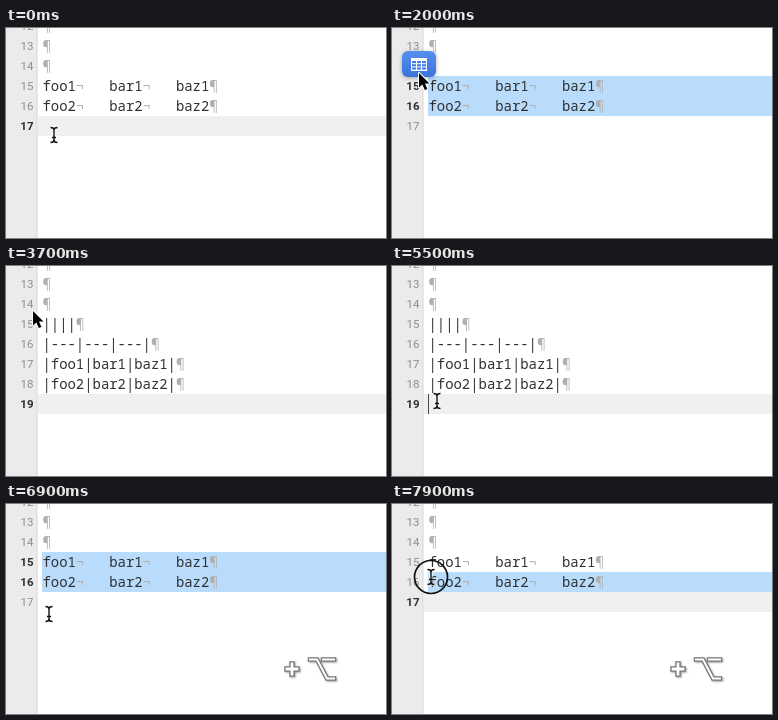
Recreate the animation shown at these times as an HTML page with a canvas. Size 380 by 210 pixels, loop 8000 ms.

```html
<!DOCTYPE html>
<html lang="en">
<head>
<meta charset="utf-8">
<title>Tabbed text to table</title>
<style>
html, body { margin: 0; width: 100%; height: 100%; overflow: hidden; background: #fff; }
canvas { display: block; }
</style>
</head>
<body>
<canvas id="stage" width="380" height="210"></canvas>
<script>
const ctx = document.getElementById('stage').getContext('2d');
const LOOP = 8000, STEP = 100, ROW = 20, LEFT = 36.5, CELL = 8.34;
const MONO = '13.9px "Noto Sans Mono", "DejaVu Sans Mono", monospace';
const TABBED = ['¶', '¶', '¶', 'foo1¬\tbar1¬\tbaz1¶', 'foo2¬\tbar2¬\tbaz2¶', ''];
const TABLE = ['¶', '¶', '¶', '||||¶', '|---|---|---|¶', '|foo1|bar1|baz1|¶', '|foo2|bar2|baz2|¶', ''];

// Pointer path: time, x, y
const PATH = [
  [400, 48, 107], [500, 47, 104], [600, 42, 95], [700, 34, 79], [800, 29, 68], [1000, 27, 61],
  [1400, 27, 61], [1700, 27, 45],
  [4700, 27, 45], [4900, 28, 51], [5200, 38, 105], [5400, 44, 132], [5500, 45, 135],
  [6500, 45, 135], [6700, 44, 124], [6900, 43, 110], [7200, 42, 103],
  [7600, 42, 103], [7700, 42, 97], [7800, 40, 84], [7900, 39, 73]
];

const within = (t, ...spans) => spans.some(([a, b]) => t >= a && t < b);
const rowTop = line => 48 + (line - 15) * ROW;

function pointerAt(t) {
  const i = PATH.findIndex(p => p[0] > t);
  if (i === 0) return PATH[0].slice(1);
  if (i < 0) return PATH[PATH.length - 1].slice(1);
  const [t0, x0, y0] = PATH[i - 1], [t1, x1, y1] = PATH[i];
  const k = (t - t0) / (t1 - t0);
  return [x0 + (x1 - x0) * k, y0 + (y1 - y0) * k];
}

function fillRect(color, x, y, w, h) {
  ctx.fillStyle = color;
  ctx.fillRect(x, y, w, h);
}

function outline(path, color, width) {
  ctx.strokeStyle = color;
  ctx.lineWidth = width;
  ctx.stroke(path);
}

function drawLine(text, line) {
  let col = 0;
  ctx.font = MONO;
  ctx.textAlign = 'left';
  for (const ch of text) {
    if (ch === '\t') {
      col = (Math.floor(col / 8) + 1) * 8;
      continue;
    }
    ctx.fillStyle = '¶¬'.includes(ch) ? '#b0b0b0' : '#303030';
    ctx.fillText(ch, LEFT + col++ * CELL, rowTop(line) + 14.5);
  }
}

function drawNumber(line, bold) {
  ctx.font = (bold ? 'bold ' : '') + '11.5px Roboto, "Liberation Sans", sans-serif';
  ctx.textAlign = 'right';
  ctx.fillStyle = bold ? '#303030' : '#8e8e8e';
  ctx.fillText(line, 27.5, rowTop(line) + 14.3);
}

function drawButton(alpha) {
  ctx.save();
  ctx.globalAlpha = alpha;
  ctx.shadowColor = 'rgba(0,0,0,.3)';
  ctx.shadowBlur = 4;
  ctx.shadowOffsetY = 1;
  const blue = ctx.createLinearGradient(0, 23, 0, 49);
  blue.addColorStop(0, '#5590f0');
  blue.addColorStop(1, '#3a74dc');
  ctx.fillStyle = blue;
  ctx.beginPath();
  ctx.roundRect(10, 23, 34, 26, 6);
  ctx.fill();
  ctx.shadowColor = 'transparent';
  fillRect('#fff', 19, 30, 16, 13);
  for (let r = 0; r < 3; r++)
    for (let c = 0; c < 3; c++)
      fillRect('#4380e4', 20 + c * 5, 33 + r * 3.2, 4, 2.2);
  ctx.restore();
}

function drawKeys() {
  const plus = new Path2D('M286 160V170M281 165H291');
  const option = new Path2D('M304 155.5H311L321 174.5H328M317 155.5H328');
  ctx.save();
  ctx.lineCap = 'square';
  ctx.shadowColor = 'rgba(0,0,0,.35)';
  ctx.shadowBlur = 2;
  ctx.shadowOffsetX = ctx.shadowOffsetY = 1;
  outline(plus, '#777', 5.5);
  outline(option, '#777', 4.5);
  ctx.shadowColor = 'transparent';
  outline(plus, '#fff', 2.8);
  outline(option, '#fff', 2);
  ctx.restore();
}

function drawPointer(x, y, arrow, ring) {
  ctx.save();
  ctx.translate(x, y);
  if (ring) {
    const circle = new Path2D();
    circle.arc(0, 0, 16.5, 0, 7);
    outline(circle, '#111', 1.7);
  }
  ctx.lineJoin = 'round';
  if (arrow) {
    const shape = new Path2D('M0 0V14.5L3.4 11.4L5.8 17L8.4 15.9L6 10.5H10.5Z');
    outline(shape, '#fff', 2);
    ctx.fillStyle = '#000';
    ctx.fill(shape);
  } else {
    const beam = new Path2D('M-3.5 -7.5Q0 -7.5 0 -5Q0 -7.5 3.5 -7.5M0 -5V5M-3.5 7.5Q0 7.5 0 5Q0 7.5 3.5 7.5M-2 2.5H2');
    outline(beam, 'rgba(255,255,255,.8)', 3);
    outline(beam, '#111', 1.4);
  }
  ctx.restore();
}

function draw(t) {
  const [x, y] = pointerAt(t);
  const table = within(t, [3000, 5900]);
  const lines = table ? TABLE : TABBED;
  const last = table ? 19 : 17;
  const chosen = within(t, [1400, 3000], [5900, 7200]);
  const dragging = within(t, [400, 1400], [7500, LOOP]);
  const firstSelected = chosen ? 15 : dragging ? Math.floor((y - 48) / ROW) + 15 : 17;

  fillRect('#fff', 0, 0, 380, 210);
  fillRect('#ebebeb', 0, 0, 31, 210);
  fillRect('#d6d6d6', 30.5, 0, 1, 210);
  if (!chosen) fillRect('#f0f0f0', 32, rowTop(last), 348, ROW);
  if (!table && firstSelected < 17)
    fillRect('#b9dcfc', 36, rowTop(firstSelected), 344, (17 - firstSelected) * ROW);

  lines.forEach((text, i) => {
    const line = 12 + i;
    drawLine(text, line);
    drawNumber(line, chosen ? line === 15 || line === 16 : line === last);
  });

  if (within(t, [3000, 3700], [4200, 4800], [5300, 5900]))
    fillRect('#444', 36, rowTop(19), 1, ROW);
  if (within(t, [1600, 3100])) drawButton(t < 3000 ? 1 : 0.4);
  if (t >= 6300) drawKeys();

  const arrow = within(t, [1600, 5500]) && x < 31;
  drawPointer(x, y, arrow, dragging || within(t, [2800, 3000], [7200, 7300]));
}

const start = performance.now();
function tick(now) {
  const t = Math.max(0, now - start) % LOOP;
  draw(Math.floor(t / STEP) * STEP);
  requestAnimationFrame(tick);
}
draw(0);
requestAnimationFrame(tick);
</script>
</body>
</html>
```
